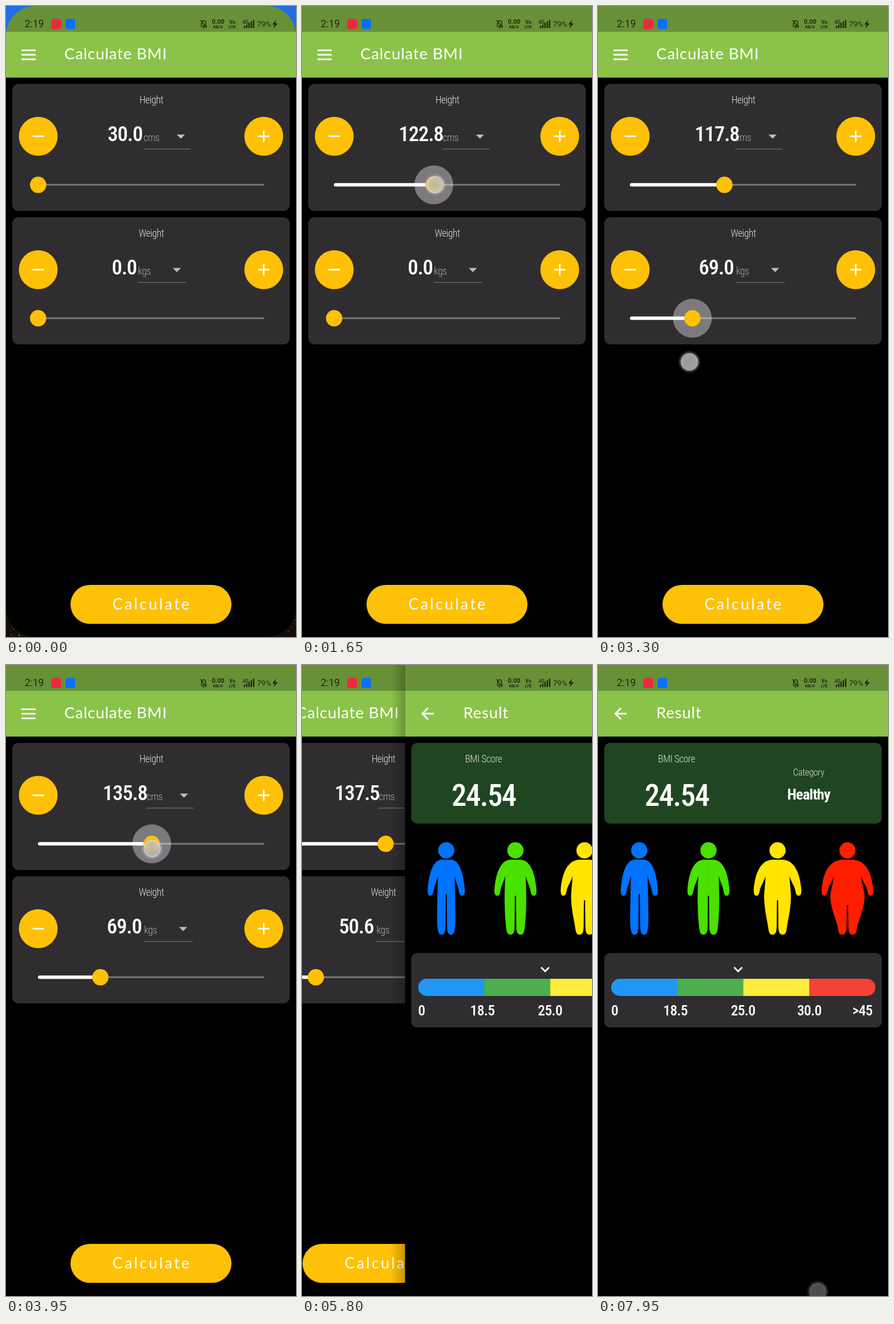
Recreate the animation shown at these times as an HTML page. Size 508 by 1102 pixels, loop 8 s.

```html
<!DOCTYPE html>
<html lang="en">
<head>
<meta charset="utf-8">
<title>BMI calculator</title>
<style>
html, body { margin: 0; width: 100%; height: 100%; overflow: hidden; background: #000; }
svg { position: absolute; left: 0; top: 0; width: 508px; height: 1102px; overflow: hidden; }
.round { font-family: Lato, "Open Sans", sans-serif; fill: #fff; }
.hand { font-family: "Roboto Condensed", "Noto Sans", "Open Sans", sans-serif; font-stretch: 62.5%; letter-spacing: -.03em; }
.status { font-family: Roboto, Inter, sans-serif; fill: #1d2b10; }
</style>
</head>
<body>
<svg id="wall" viewBox="0 0 508 1102"></svg>
<svg id="app" viewBox="0 0 508 1102">
  <defs>
    <radialGradient id="dot">
      <stop offset="0" stop-color="#b4b2b0" stop-opacity=".85"/>
      <stop offset=".62" stop-color="#c4c3c4" stop-opacity=".82"/>
      <stop offset=".72" stop-color="#dfe4ee" stop-opacity=".75"/>
      <stop offset=".78" stop-color="#b9c0cc" stop-opacity=".4"/>
      <stop offset="1" stop-color="#aab2c0" stop-opacity="0"/>
    </radialGradient>
    <linearGradient id="edge">
      <stop offset="0" stop-color="#000" stop-opacity="0"/>
      <stop offset="1" stop-color="#000" stop-opacity=".22"/>
    </linearGradient>
    <clipPath id="pill"><rect x="23" y="548" width="463" height="30" rx="15"/></clipPath>
  </defs>
  <g id="home"></g>
  <g id="result"></g>
  <g id="status"></g>
  <circle id="touch" r="20" fill="url(#dot)" opacity="0"/>
</svg>
<script>
const LOOP = 8000;
const $ = id => document.getElementById(id);
const clamp = (v, a = 0, b = 1) => Math.min(b, Math.max(a, v));

function add(parent, tag, attrs) {
  const el = document.createElementNS('http://www.w3.org/2000/svg', tag);
  for (const k in attrs) el.setAttribute(k, attrs[k]);
  return parent.appendChild(el);
}
const rect = (p, x, y, width, height, fill, rx = 0) => add(p, 'rect', { x, y, width, height, fill, rx });
const disc = (p, cx, cy, r, fill) => add(p, 'circle', { cx, cy, r, fill });
const line = (p, d, stroke, width, cap = 'butt') =>
  add(p, 'path', { d, stroke, 'stroke-width': width, 'stroke-linecap': cap, fill: 'none' });
function text(p, str, x, y, size, cls, more = {}) {
  const el = add(p, 'text', { x, y, class: cls, 'font-size': size, ...more });
  el.textContent = str;
  return el;
}

// One common scale for the narrow lettering, whichever face is available.
const probe = text($('home'), '30.0', 0, 0, 50, 'hand', { 'font-weight': 500 });
const narrow = clamp(61 / probe.getComputedTextLength(), .72, 1);
probe.remove();
const hand = (p, str, x, y, size, weight = 500, fill = '#fff', anchor = 'middle') =>
  text(p, str, x, y, size * narrow, 'hand', { 'font-weight': weight, fill, 'text-anchor': anchor });

function page(p, title) {
  rect(p, 0, 0, 508, 1102, '#000');
  rect(p, 0, 45, 508, 80, '#8bc34a');
  rect(p, 0, 0, 508, 45, '#689137');
  text(p, title, 102, 93, 27.6, 'round', { 'letter-spacing': .8 });
}

// Slider card: returns the parts that move.
function card(p, y, label, unit, dropWidth, max, min) {
  const g = add(p, 'g', { transform: `translate(0 ${y})` });
  rect(g, 11, 0, 486, 222, '#2f2d2f', 11);
  hand(g, label, 254.5, 34, 24, 300, '#dedede');
  for (const x of [56.5, 451.5]) {
    disc(g, x, 91.5, 34, '#ffc107');
    line(g, `M${x - 10} 91.5h20`, '#fff', 2.7);
  }
  line(g, 'M451.5 81.5v20', '#fff', 2.7);
  const value = hand(g, '', 251.5 - dropWidth / 2 - 2, 100, 50);
  const drop = add(g, 'g', {});
  hand(drop, unit, 0, 100, 24, 300, '#a9a9a9', 'start');
  const a = dropWidth - 24;
  add(drop, 'path', { d: `M${a} 88.5h14.5l-7.2 7.2z`, fill: '#bdbdbd' });
  line(drop, `M0 113.8h${dropWidth}`, '#747274', 1.3);
  line(g, 'M57 176.3H451', '#777779', 3, 'round');
  const active = line(g, '', '#fff', 6, 'round');
  const halo = disc(g, 0, 176.3, 0, 'rgba(255,255,255,.37)');
  const thumb = disc(g, 0, 176.3, 14.3, '#ffc107');
  return { value, drop, active, halo, thumb, dropWidth, min, max };
}

const advance = { 0: 18, 1: 10, 2: 19, 3: 17, 4: 22, 5: 21, 6: 20, 7: 16, 8: 16, 9: 20, '.': 9 };
function setCard(c, v, glow) {
  const str = v.toFixed(1);
  const width = [...str].reduce((sum, ch) => sum + advance[ch], 0);
  const x = 56.3 + (v - c.min) / (c.max - c.min) * 395;
  c.value.textContent = str;
  c.drop.setAttribute('transform', `translate(${251 + (width - c.dropWidth) / 2} 0)`);
  c.active.setAttribute('d', x > 57 ? `M59 176.3H${Math.max(59, x)}` : '');
  c.thumb.setAttribute('cx', x);
  c.halo.setAttribute('cx', x);
  c.halo.setAttribute('r', 34 * glow);
}

const home = $('home');
page(home, 'Calculate BMI');
line(home, 'M27 77.3h25M27 85.2h25M27 93.1h25', '#fff', 2.7);
const height = card(home, 136, 'Height', 'cms', 82, 240, 30);
const weight = card(home, 369, 'Weight', 'kgs', 85, 250, 0);
rect(home, 113, 1011, 282, 68, '#ffc107', 34);
text(home, 'Calculate', 255.5, 1054, 27, 'round', { 'letter-spacing': 3.2, 'text-anchor': 'middle' });

// Half a figure; s: arm, a: armpit, t: hip, f: foot, all measured from the middle.
function figure(p, cx, fill, s, a, t, f, split) {
  disc(p, cx, 323.7, 14.2, fill);
  const d = `M-.3 340H8C${s * .72} 340 ${s - 2} 365 ${s} 393
    C${s + .5} 400 ${s - 2} 403 ${s - 4.5} 403C${s - 8} 403 ${s - 9.5} 400 ${s - 10.5} 394
    C${s - 12} 385 ${a + 2} 378 ${a} 368C${a} 380 ${t} 392 ${t} 405
    C${t} 425 ${f + 2} 446 ${f} 461C${f - 1} 468 ${f - 3} 471 ${f - 7} 471
    C3 471 1.7 466 1.5 455L1 ${split}H-.3z`;
  for (const side of [1, -1]) add(p, 'path', { d, fill, transform: `translate(${cx} 0) scale(${side} 1)` });
}

const result = $('result');
rect(result, -25, 0, 25, 1102, 'url(#edge)');
page(result, 'Result');
line(result, 'M50 85H31M40.5 75l-10 10 10 10', '#fff', 2.8);
rect(result, 11, 136, 486, 141, '#1f4620', 10);
hand(result, 'BMI Score', 137.5, 170, 24, 300, '#d5dcd5');
hand(result, '24.54', 138, 246, 72, 500);
hand(result, 'Category', 369, 193, 23, 300, '#d5dcd5');
hand(result, 'Healthy', 369, 235, 36, 600);
figure(result, 72.3, '#0073ff', 32.5, 14.5, 15.5, 15, 400);
figure(result, 193.5, '#4ae000', 36.8, 18, 19, 16, 403);
figure(result, 314.5, '#ffe500', 41.7, 21, 23.5, 16, 411);
figure(result, 437, '#ff1e00', 45.3, 24, 30, 16.5, 419);
rect(result, 11, 503, 486, 130, '#2f2d30', 10);
line(result, 'M238.5 528l7 7 7-7', '#fff', 2.8);
const bar = add(result, 'g', { 'clip-path': 'url(#pill)' });
['#2196f3', '#4caf50', '#ffeb3b', '#f44336'].forEach((c, i) => rect(bar, 23 + i * 115.75, 548, 116, 30, c));
[['0', 29], ['18.5', 135.5], ['25.0', 254], ['30.0', 370], ['>45', 463]]
  .forEach(([s, x]) => hand(result, s, x, 612, 35));

const st = $('status');
const ink = '#1d2b10';
const tag = (s, x, y, size, weight = 400) =>
  text(st, s, x, y, size, 'status', { 'font-weight': weight, 'text-anchor': 'middle' });
tag('2:19', 49.5, 37, 17.5);
rect(st, 79, 22.5, 17.5, 17.5, '#f4263f', 4);
rect(st, 104, 22.5, 17, 17.5, '#0d6efd', 4);
line(st, 'M341.5 35.5H351.500M342.500 35.500V31q0-5 3.500-5.500 4 .5 4 5.500v4.500M344.500 38h4M340.500 25l11 13', ink, 1.4);
tag('0.00', 371.5, 30.5, 11, 600);
tag('KB/S', 371.5, 39, 7.5, 600);
tag('Vo', 396.5, 31, 9, 700);
tag('LTE', 396.5, 39, 7.5, 700);
tag('4G', 419.5, 31, 8.5, 500);
[4, 6, 9, 12, 14.5].forEach((h, i) => rect(st, 416.5 + i * 4, 38.5 - h, 2.5, h, ink));
tag('79%', 452, 36, 13.5);
add(st, 'path', { d: 'M473 23.500l-6.500 9h4l-2 7 7.500-9.500h-4.500z', fill: ink });

// Wallpaper behind the opening window
const wall = $('wall');
rect(wall, 0, 0, 508, 551, '#216fe4');
rect(wall, 0, 551, 508, 551, '#120d09');
let seed = 7;
const rnd = () => (seed = seed * 16807 % 2147483647) / 2147483647;
for (let i = 0; i < 36; i++) {
  const x = rnd() * 40, y = 1062 + rnd() * 40;
  disc(wall, i % 2 ? x : 508 - x, y, .5 + rnd(), i % 3 ? '#5f4020' : '#8f6630');
}

// Interpolates rows of [time, ...values].
function at(rows, t) {
  const i = rows.findIndex(r => r[0] > t);
  if (i < 0) return rows[rows.length - 1].slice(1);
  if (i === 0) return rows[0].slice(1);
  const a = rows[i - 1], b = rows[i], u = (t - a[0]) / (b[0] - a[0]);
  return a.slice(1).map((v, k) => v + (b[k + 1] - v) * u);
}

const heights = [[1050, 30], [1100, 33], [1150, 42.5], [1300, 82], [1500, 113], [1700, 126], [1850, 121],
  [2000, 117.8], [3680, 117.8], [3800, 126], [3920, 135], [4020, 137.5]];
const weights = [[2450, 0], [2600, 14], [2800, 52], [2950, 78], [3100, 76], [3240, 69], [5099, 69], [5100, 50.6]];
const heightGlow = [[1060, 2080], [3630, 4080]];
const weightGlow = [[2420, 3320], [5110, 5270]];
const touches = [
  [[1040, 58, 312], [1090, 82, 312], [1150, 119, 312], [1300, 180, 312], [1500, 226, 312], [1700, 236, 312], [1850, 225, 312], [2080, 222, 312]],
  [[2370, 66, 535], [2400, 67, 535], [2550, 84, 538], [2750, 146, 552], [2890, 182, 575], [3050, 175, 604], [3240, 164, 620], [3320, 159, 622]],
  [[3600, 222, 318], [3660, 224, 318], [3860, 250, 320], [3980, 258, 321], [4050, 259, 321]],
  [[5070, 137, 558], [5280, 137, 558]],
  [[5640, 255, 1046], [5700, 255, 1046]]
];
const glow = (spans, t) => Math.max(...spans.map(([a, b]) => clamp((t - a) / 95) * clamp((b + 120 - t) / 120)));

const slide = { duration: 450, delay: 5680, fill: 'both', easing: 'cubic-bezier(.35,.91,.33,.97)' };
const moves = [
  home.animate({ transform: ['translateX(0)', 'translateX(-169px)'] }, slide),
  result.animate({ transform: ['translateX(535px)', 'translateX(0)'] }, slide),
  $('app').animate({ borderRadius: ['52px', '0px'] }, { duration: 350, delay: 0, fill: 'both', easing: 'ease-in-out' })
];
moves.forEach(m => m.pause());

function draw(t) {
  moves.forEach(m => { m.currentTime = t; });
  setCard(height, at(heights, t)[0], glow(heightGlow, t));
  setCard(weight, at(weights, t)[0], glow(weightGlow, t));
  let x = 385, y = 1094, alpha = clamp((t - 7780) / 170) * .5;
  for (const path of touches) {
    const start = path[0][0], end = path[path.length - 1][0];
    if (t < start || t > end + 100) continue;
    [x, y] = at(path, t);
    alpha = clamp((t - start) / 30) * clamp((end + 100 - t) / 100);
  }
  const touch = $('touch');
  touch.setAttribute('cx', x);
  touch.setAttribute('cy', y);
  touch.setAttribute('opacity', alpha);
}

const begin = performance.now();
function tick() {
  draw((performance.now() - begin) % LOOP);
  requestAnimationFrame(tick);
}
tick();
</script>
</body>
</html>
```
